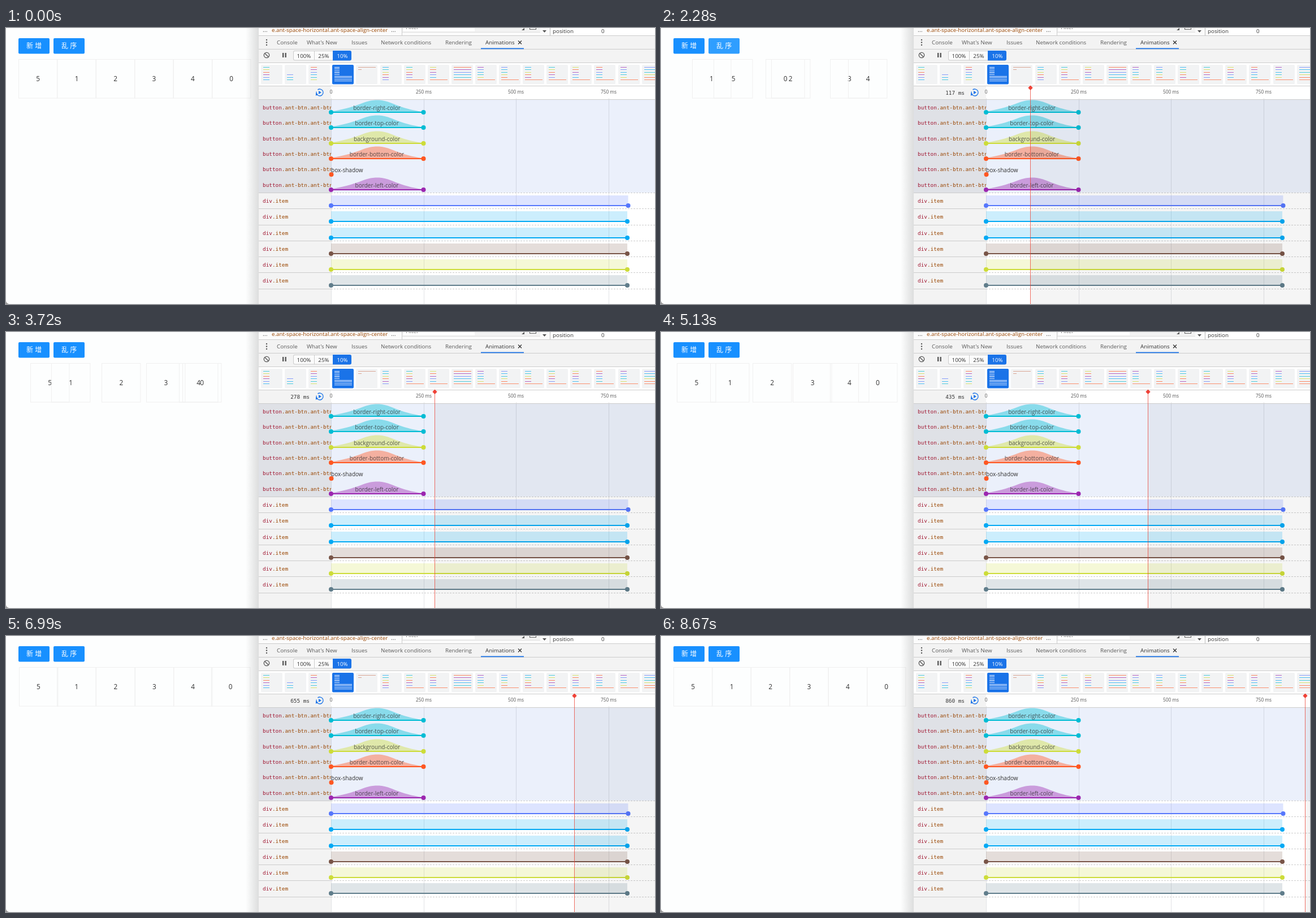
Recreate the animation shown at these times as an HTML page with a canvas. Size 1148 by 488 pixels, loop 8700 ms.

```html
<!DOCTYPE html>
<html lang="en">
<head>
<meta charset="utf-8">
<style>
html, body { margin: 0; width: 100%; height: 100%; overflow: hidden; background: #fdfefe; }
canvas { display: block; }
</style>
</head>
<body>
<canvas width="1148" height="488"></canvas>
<script>
const W = 1148, H = 488, LOOP = 8700, START = 1200, DURATION = 800;
const g = document.querySelector('canvas').getContext('2d');
const SANS = '"Open Sans", "Noto Sans", sans-serif';
const MONO = '"DejaVu Sans Mono", monospace';
const CJK = '"Noto Sans CJK SC", "Noto Sans CJK", sans-serif';
const BLUE = '#1a73e8', LINE = '#ccc', DARK = '#333';
const CYAN = '#00bcd4', LIME = '#cddc39', ORANGE = '#ff5722', SKY = '#03a9f4';
const PALETTE = [CYAN, LIME, ORANGE, '#9c27b0', '#5677fc', SKY];

const transitions = [
  ['border-right-color', CYAN], ['border-top-color', CYAN],
  ['background-color', LIME], ['border-bottom-color', ORANGE],
  ['box-shadow', ORANGE], ['border-left-color', '#9c27b0']
];
const bars = ['#5677fc', SKY, SKY, '#795548', LIME, '#607d8b'];
// label and starting offset in slots
const items = [[5, 2], [1, -1], [2, 1], [3, 2], [4, 1], [0, -5]];
// page time -> animation clock
const clock = [[START, 0], [2280, 117], [5130, 435], [6090, 543], [6990, 655], [8670, 860]];

const lerp = (a, b, k) => a + (b - a) * k;
const timeX = ms => 575.5 + ms * 0.6545;

function clockAt(t) {
  const i = Math.max(1, clock.findIndex(p => p[0] >= t));
  const [t0, m0] = clock[i - 1], [t1, m1] = clock[i];
  return lerp(m0, m1, (t - t0) / (t1 - t0));
}

const cubic = (a, b, s) => 3 * a * s * (1 - s) ** 2 + 3 * b * s * s * (1 - s) + s ** 3;
function ease([x1, y1, x2, y2], p) {
  if (p <= 0) return 0;
  if (p >= 1) return 1;
  let lo = 0, hi = 1;
  for (let i = 0; i < 24; i++) {
    const mid = (lo + hi) / 2;
    if (cubic(x1, x2, mid) < p) lo = mid; else hi = mid;
  }
  return cubic(y1, y2, lo);
}
const MOVE = [0.25, 0.83, 0.25, 1];
const COLOR = [0.645, 0.045, 0.355, 1];

function rect(x, y, w, h, color) {
  g.fillStyle = color;
  g.fillRect(x, y, w, h);
}
function round(x, y, w, h, r, color) {
  g.fillStyle = color;
  g.beginPath();
  g.roundRect(x, y, w, h, r);
  g.fill();
}
function text(s, x, y, size = 9.8, color = '#5a5a5a', align = 'left', font = SANS) {
  g.font = size + 'px ' + font;
  g.textAlign = align;
  g.fillStyle = color;
  g.fillText(s, x, y);
}
function stroke(points, color, width = 1, dash = []) {
  g.strokeStyle = color;
  g.lineWidth = width;
  g.setLineDash(dash);
  g.beginPath();
  points.forEach(p => g.lineTo(...p));
  g.stroke();
  g.setLineDash([]);
}
function dot(x, y, r, color) {
  g.fillStyle = color;
  g.beginPath();
  g.arc(x, y, r, 0, 7);
  g.fill();
}
function ring(x, y, r, color, from = 0, to = 7) {
  g.strokeStyle = color;
  g.lineWidth = 1.3;
  g.beginPath();
  g.arc(x, y, r, from, to);
  g.stroke();
}
function polygon(points, color) {
  g.fillStyle = color;
  g.beginPath();
  points.forEach(p => g.lineTo(...p));
  g.fill();
}

function button(x, label, color) {
  round(x, 18, 55, 27.4, 2, color);
  [...label].forEach((c, i) => text(c, x + 20 + 15.3 * i, 36.3, '500 12', '#fff', 'center', CJK));
}

function page(ms) {
  rect(0, 0, 447, H, '#fdfefe');
  const k = ms === null ? 1 : ease(COLOR, ms / 250);
  button(22, '新增', '#1890ff');
  button(84, '乱序', `rgb(${lerp(64, 24, k)},${lerp(169, 144, k)},255)`);

  const rest = ms === null ? 0 : 1 - ease(MOVE, ms / DURATION);
  items.forEach(([n, slots], i) => {
    const x = 22.5 + 68.4 * (i + slots * rest);
    g.strokeStyle = '#f0f0f0';
    g.lineWidth = 1;
    g.strokeRect(Math.floor(x) + 0.5, 55.5, 68.4, 68.5);
    text(n, x + 34.2, 94.3, 11.8, DARK, 'center');
  });

  const shade = g.createLinearGradient(424, 0, 447, 0);
  shade.addColorStop(0, 'rgba(0,0,0,0)');
  shade.addColorStop(1, 'rgba(0,0,0,.13)');
  rect(424, 0, 23, H, shade);
  polygon([[0, 483], [1.5, 486], [5, 488], [0, 488]], '#999');
}

// rows of a preview: count, first row shown, first row that runs the full width
function preview(i) {
  if (i === 1) return [6, 3, 6];
  if (i === 3) return [10, 0, 6];
  if (i === 8 || i === 16) return [6, 0, 0];
  return [6, 0, i < 6 ? 6 : 5];
}
function thumb(i) {
  const x = 451 + Math.round(42.1 * i), selected = i === 3;
  round(x, 65, 38, 34.5, 2, selected ? BLUE : '#f2f3f4');
  if (i === 4) {
    rect(x + 4, 69, 31, 1, '#d9a594');
    rect(x + 4, 73, 6, 1, '#d9a594');
    return;
  }
  const [rows, first, long] = preview(i);
  for (let j = first; j < rows; j++) {
    const y = 68 + Math.floor(27 / rows * j + 1);
    const color = selected ? '#dbe8ff' : i > 5 && j === 5 ? ORANGE + 'a0' : PALETTE[(j + i) % 6] + 'b0';
    rect(x + 4, y, j < long ? (selected ? 9 : 11) : 31, 1, color);
  }
}

function toolbars() {
  rect(447, 0, W - 447, H, '#fff');
  rect(447, 0, W - 447, 61, '#f3f3f3');
  rect(447, 0, 515, 13, '#fbfbfb');
  rect(962, 0, W - 962, 13, '#fff');
  text('…', 454, 7, 11);
  text('e.ant-space-horizontal.ant-space-align-center', 470, 6.5, 9.75, '#994500');
  text('…', 681, 7, 11);
  rect(700, 0, 1, 13, LINE);
  rect(701, 0, 244, 7, '#f3f3f3');
  rect(703, 0, 126, 6, '#fff');
  text('Filter', 707, 2, 9.8, '#777');
  rect(701, 7, 244, 1, '#ddd');
  polygon([[912, 4], [917, 4], [917, 0]], '#555');
  g.strokeStyle = '#666';
  g.lineWidth = 1;
  g.strokeRect(926.5, -4.5, 11, 7);
  polygon([[949, 4], [956, 4], [952.5, 8]], '#555');
  rect(962, 0, 1, 13, '#bbb');
  text('position', 967, 9, 9.8, DARK);
  text('0', 1053, 9, 9.8, DARK);
  rect(447, 13, W - 447, 1, LINE);

  [21, 25.5, 30].forEach(y => dot(461, y, 1.2, '#555'));
  [['Console', 479], ["What's New", 532], ['Issues', 611], ['Network conditions', 663], ['Rendering', 777]]
    .forEach(([s, x]) => text(s, x, 29));
  text('Animations', 848, 29, 9.8, DARK);
  stroke([[906, 22.5], [912, 28.5]], DARK, 1.3);
  stroke([[912, 22.5], [906, 28.5]], DARK, 1.3);
  rect(447, 37, W - 447, 1, LINE);
  rect(840, 35.5, 76, 1.7, BLUE);

  ring(461, 48, 4.7, '#555');
  stroke([[457.7, 44.7], [464.3, 51.3]], '#555', 1.3);
  rect(489, 44, 2.3, 8, '#555');
  rect(493.5, 44, 2.3, 8, '#555');
  round(508, 40, 103, 17.5, 3, LINE);
  round(509, 41, 101, 15.5, 2, '#fbfbfb');
  rect(545, 40, 1, 17, LINE);
  round(578, 40, 33, 17.5, [0, 3, 3, 0], BLUE);
  text('100%', 527, 52.5, 9.8, DARK, 'center');
  text('25%', 562, 52.5, 9.8, DARK, 'center');
  text('10%', 595, 52.5, 9.8, '#fff', 'center');
  rect(447, 61, W - 447, 1, LINE);
  for (let i = 0; i < 17; i++) thumb(i);
  rect(447, 102, W - 447, 1, LINE);
}

// speed of the colour easing, squashed so that steep parts stay inside the row
function bell(y, color) {
  const [x1, y1, x2, y2] = COLOR, points = [[575, y]];
  for (let i = 1; i <= 40; i++) {
    const s = i / 40, before = s - 1 / 40;
    const px = cubic(x1, x2, before), dx = cubic(x1, x2, s) - px;
    const slope = (cubic(y1, y2, s) - cubic(y1, y2, before)) / dx;
    points.push([575 + 163.6 * (px + dx * s), y - Math.tanh(slope / 1.5) * 22.6]);
  }
  points.push([738.6, y]);
  polygon(points, color + '6b');
}
function track(x, y, color) {
  rect(575, y - 1, x - 575, 2, color);
  dot(575, y, 4, color);
  dot(x, y, 4, color);
}

function timeline(ms) {
  rect(447, 103, 128, H - 103, '#f3f3f3');
  rect(447, 126, 128, 165, '#dfe1e6');
  rect(575, 126, W - 575, 165, '#ebf0fb');
  [0, 250, 500, 750].forEach(m => {
    const x = Math.floor(timeX(m));
    rect(x, 124, 1, H - 124, 'rgba(60,70,90,.15)');
    text(m ? m + ' ms' : '0', x, 115.5, 8.3, '#555', 'center');
  });
  rect(447, 126, W - 447, 1, LINE);

  for (let i = 0; i < 7; i++) {
    const y = Math.round(291 + 28.25 * i) + 0.5;
    stroke([[447, y], [575, y]], LINE);
    stroke([[575, y], [W, y]], LINE, 1, [3, 2]);
  }

  g.save();
  g.beginPath();
  g.rect(447, 103, 128.5, H);
  g.clip();
  const name = (tag, rest, y) => {
    text(tag, 454, y, 9.35, '#a01630', 'left', MONO);
    text(rest, 454 + g.measureText(tag).width, y, 9.35, '#994500', 'left', MONO);
  };
  transitions.forEach((_, i) => name('button', '.ant-btn.ant-btn', 143.8 + 27.4 * i));
  bars.forEach((_, i) => name('div', '.item', 309.2 + 28.25 * i));
  g.restore();

  transitions.forEach(([s, color], i) => {
    const y = Math.round(149 + 27.4 * i), instant = s === 'box-shadow';
    if (!instant) bell(y, color);
    text(s, instant ? 575 : 656, y - 4.3, 10, instant ? DARK : 'rgba(40,40,40,.75)', instant ? 'left' : 'center');
    if (instant) dot(575.5, y, 4, color);
    else track(738.5, y, color);
  });
  bars.forEach((color, i) => {
    const y = Math.round(314.2 + 28.25 * i), end = i ? 1099 : 1100.5;
    rect(575, y - 18, end - 575, 18, color + '33');
    track(end, y, color);
  });

  ring(555, 114, 6, BLUE, -2.2, 3.4);
  polygon([[553, 111], [558, 114], [553, 117]], BLUE);
  polygon([[548, 115], [552, 117], [548, 120]], BLUE);

  if (ms === null) return;
  text(Math.round(ms) + ' ms', 537, 117.8, 9.35, DARK, 'right', MONO);
  const x = Math.floor(timeX(ms) + 1);
  rect(x, 127, W - x, H - 127, 'rgba(0,0,0,.04)');
  rect(x, 105, 1, H - 105, 'rgba(235,65,50,.75)');
  polygon([[x + 0.5, 101.5], [x + 4.7, 105.7], [x + 0.5, 110], [x - 3.7, 105.7]], '#ef4136');
}

function frame(now) {
  const t = Math.floor(now % LOOP / 30) * 30;
  const ms = t < START ? null : clockAt(t);
  page(ms);
  toolbars();
  timeline(ms);
  requestAnimationFrame(frame);
}
requestAnimationFrame(frame);
</script>
</body>
</html>
```
